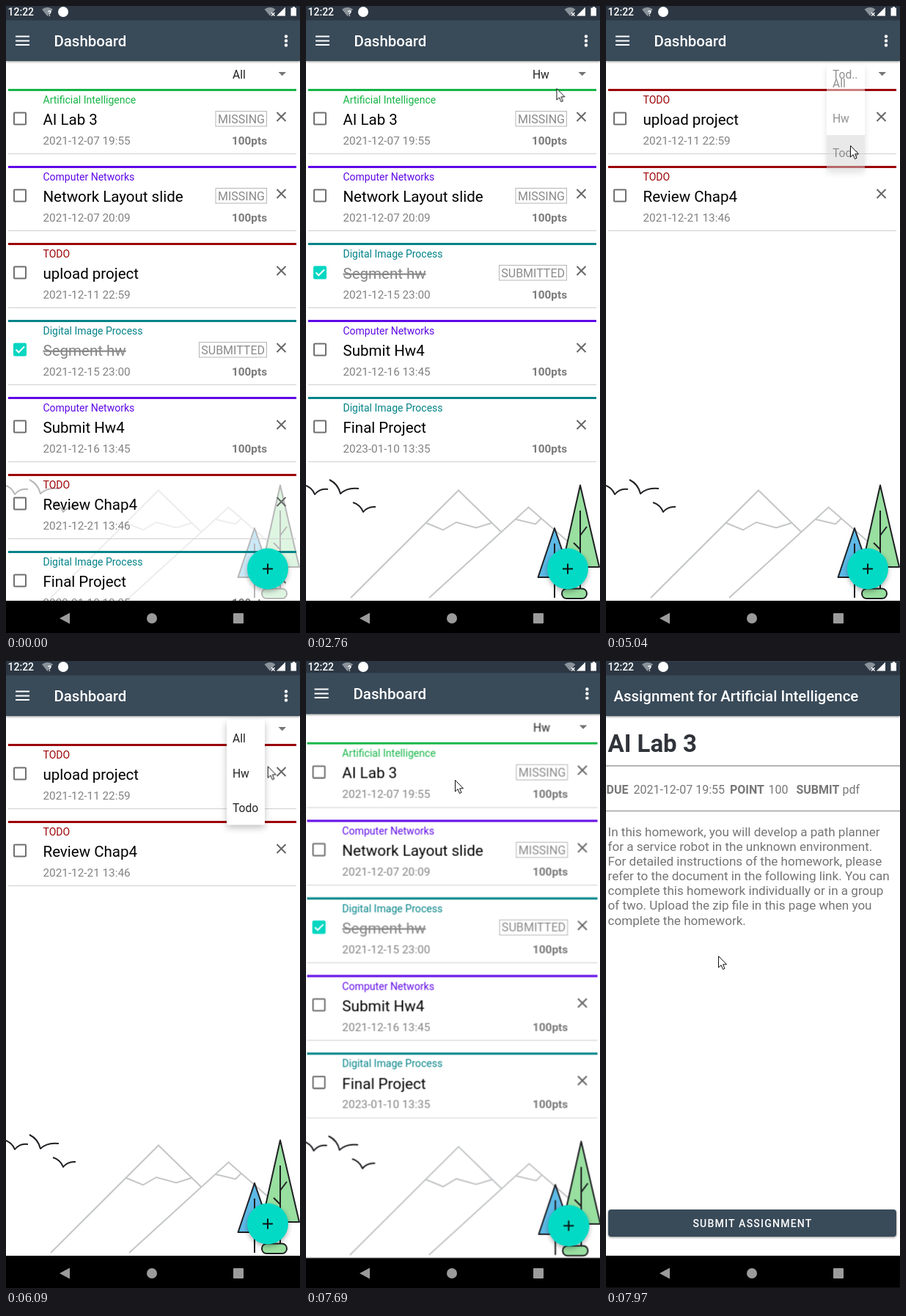
An HTML page that plays this animation: 401 by 855 pixels, repeating every 8 s.

```html
<!DOCTYPE html>
<html lang="en">
<head>
<meta charset="utf-8">
<title>Dashboard filter</title>
<style>
html, body { margin: 0; width: 100%; height: 100%; overflow: hidden; background: #fff; }
svg { display: block; width: 401px; height: 855px; font-family: Roboto, "Noto Sans", sans-serif; }
text { white-space: pre; }

.bar { fill: #394a59; filter: drop-shadow(0 1px 1.5px rgba(0,0,0,.45)); }
.head { font-size: 20.4px; font-weight: 500; fill: #fff; }
.course { font-size: 14px; }
.title { font-size: 20.5px; fill: #000; }
.done { fill: #858585; text-decoration: line-through; }
.date { font-size: 15.3px; fill: #828282; }
.pts { font-size: 15.3px; font-weight: 700; fill: #7a7a7a; text-anchor: end; }
.badge { font-size: 16px; fill: #8a8a8a; text-anchor: end; }
.label { font-size: 15.6px; fill: #222; }
.line { fill: none; stroke-width: 2; }
.ink { stroke: #202124; stroke-width: 2; stroke-linejoin: round; }
.fab { filter: drop-shadow(0 3px 3px rgba(0,0,0,.3)); }
.meta, .meta tspan { font-size: 16px; fill: #777; }
.meta .b { font-weight: 700; }
.para { font-size: 17.1px; fill: #757575; }

/* Every animation shares one 8 s clock: 1% is 80 ms. */
.anim { animation: 8s linear infinite; }
.step { animation-timing-function: step-end; }

#all { animation-name: all; }
@keyframes all { 0% { opacity: 1 } 27.1%, 100% { opacity: 0 } }
#hw { animation-name: hw; }
@keyframes hw { 0% { opacity: 0 } 27.1% { opacity: 1 } 61.75% { opacity: 0 } 82%, 100% { opacity: 1 } }
#todo { animation-name: todo; }
@keyframes todo { 0% { opacity: 0 } 61.75% { opacity: 1 } 82%, 100% { opacity: 0 } }
#art { animation-name: art; }
@keyframes art { 0% { opacity: .32 } 27.1%, 100% { opacity: 1 } }

#popup { animation-name: popup; filter: drop-shadow(0 4px 5px rgba(0,0,0,.24)); }
@keyframes popup {
  0%, 15.5% { opacity: 0; clip-path: inset(0 0 110px 0) }
  18%, 27.1% { opacity: 1; clip-path: inset(-20px) }
  29.6% { opacity: 0; clip-path: inset(-20px) }
  29.61%, 51.375% { opacity: 0; clip-path: inset(0 0 110px 0) }
  54%, 61.75% { opacity: 1; clip-path: inset(-20px) }
  64.25% { opacity: 0; clip-path: inset(-20px) }
  64.26%, 71% { opacity: 0; clip-path: inset(0 0 110px 0) }
  73.5%, 82% { opacity: 1; clip-path: inset(-20px) }
  84.5%, 100% { opacity: 0; clip-path: inset(-20px) }
}
#pressHw { animation-name: pressHw; }
@keyframes pressHw {
  0%, 25.6% { opacity: 0 } 26.4%, 29.6% { opacity: .17 }
  29.61%, 80.5% { opacity: 0 } 81.3%, 84.5% { opacity: .17 } 84.51%, 100% { opacity: 0 }
}
#pressTodo { animation-name: pressTodo; }
@keyframes pressTodo {
  0%, 60.25% { opacity: 0 } 61%, 64.25% { opacity: .17 } 64.26%, 100% { opacity: 0 }
}
#ripple { animation-name: ripple; transform-origin: 373px 92px; }
@keyframes ripple {
  0%, 14.5% { opacity: 0; transform: scale(.4) }
  15.25% { opacity: .13; transform: scale(.7) }
  16.5% { opacity: .13; transform: scale(1) }
  18.5% { opacity: 0; transform: scale(1) }
  18.51%, 50.375% { opacity: 0; transform: scale(.4) }
  51.125% { opacity: .13; transform: scale(.7) }
  52.4% { opacity: .13; transform: scale(1) }
  54.4% { opacity: 0; transform: scale(1) }
  54.41%, 70% { opacity: 0; transform: scale(.4) }
  70.75% { opacity: .13; transform: scale(.7) }
  72% { opacity: .13; transform: scale(1) }
  74%, 100% { opacity: 0; transform: scale(1) }
}

#dash, #zoom { transform-origin: 200.5px 427.5px; }
#dash { animation-name: leave; }
@keyframes leave {
  0% { transform: scale(1) }
  95.75% { transform: scale(1); animation-timing-function: cubic-bezier(.3,0,.8,.15) }
  96.59% { transform: scale(1.06); animation-timing-function: cubic-bezier(.06,.7,.12,1) }
  100% { transform: scale(1.15) }
}
#zoom { animation-name: enter; }
@keyframes enter {
  0% { transform: scale(.85) }
  95.75% { transform: scale(.85); animation-timing-function: cubic-bezier(.3,0,.8,.15) }
  96.59% { transform: scale(.91); animation-timing-function: cubic-bezier(.06,.7,.12,1) }
  100% { transform: scale(1) }
}
#detail { animation-name: show; }
@keyframes show { 0%, 96.19% { opacity: 0 } 96.81%, 100% { opacity: 1 } }

#cursor { animation-name: cursor; }
@keyframes cursor {
  0%, 4.99% { opacity: 0; transform: translate(387px,146px) }
  5% { opacity: 1; transform: translate(387px,146px) }
  8%, 10.85% { transform: translate(343px,99px) }
  10.875%, 12.6% { transform: translate(343px,98px) }
  12.625%, 21.3% { transform: translate(331px,86px) }
  24.2%, 31.5% { transform: translate(325px,151px) }
  37%, 40.6% { transform: translate(355px,80px) }
  41.6% { transform: translate(343px,68px) }
  42.6%, 45.22% { transform: translate(355px,81px) }
  45.25%, 47.2% { transform: translate(355px,82px) }
  49.5%, 54.5% { transform: translate(355px,90px) }
  59.5%, 68% { transform: translate(333px,190px) }
  69.9%, 73.6% { transform: translate(357px,84px) }
  76.1% { transform: translate(357px,143px) }
  77.1%, 79.1% { transform: translate(350px,150px) }
  80.2%, 83% { transform: translate(325px,150px) }
  86.4%, 92% { transform: translate(191px,150px) }
  93%, 96.2% { transform: translate(203px,162px) }
  99.5%, 100% { opacity: 1; transform: translate(153px,402px) }
}
</style>
</head>
<body>
<svg viewBox="0 0 401 855">
  <rect width="401" height="855" fill="#fff"/>

  <g id="dash" class="anim">
    <rect width="401" height="855" fill="#fff"/>
    <g id="art" class="anim step">
      <g class="line" stroke="#c4c6c7">
        <path d="M61 807 208 660.500 266 717M168 807 303.500 683.500 358 731"/>
        <path d="M164 705 187 714.500 205 704 232 711.500 253 705M286 700 313 706.500 321 698.500"/>
      </g>
      <path class="ink" fill="none" d="M-3 653Q8 656 12 666Q19 657 30 659M32 646Q44 652 47 665Q56 656 72 658M64 677Q74 680 78 690Q84 682 95 683"/>
      <path class="ink" fill="#5cb9e6" d="M339 712 362 779H316.500Z"/>
      <path class="ink" fill="#98dfa0" d="M374 653.500 400 765H349Z"/>
      <rect class="ink" x="349" y="794.500" width="34" height="13.500" rx="6.500" fill="#98dfa0"/>
      <path class="ink" fill="none" d="M339 733V807M374 688V795M374 722 383 710M374 741 365 732"/>
    </g>
    <g id="all" class="anim step"></g>
    <g id="hw" class="anim step"></g>
    <g id="todo" class="anim step"></g>
    <circle id="ripple" class="anim" cx="373" cy="92" r="23"/>
    <path d="M371.500 90H382L376.750 95.300Z" fill="#757575"/>

    <rect class="bar" y="19" width="401" height="56"/>
    <rect width="401" height="19.500" fill="#2c3743"/>
    <path class="line" stroke="#fff" d="M13 41.500H32M13 47.500H32M13 53H32"/>
    <text class="head" x="65.500" y="55">Dashboard</text>
    <g fill="#fff"><circle cx="382" cy="41.500" r="2.200"/><circle cx="382" cy="47.500" r="2.200"/><circle cx="382" cy="53.500" r="2.200"/></g>

    <g id="popup" class="anim">
      <rect x="301" y="80" width="52" height="143.500" rx="2" fill="#fff"/>
      <rect id="pressHw" class="anim" x="301" y="128" width="52" height="48"/>
      <rect id="pressTodo" class="anim" x="301" y="176" width="52" height="47.500"/>
      <text class="label" x="309" y="110.500">All</text>
      <text class="label" x="309" y="158.500">Hw</text>
      <text class="label" x="309" y="206">Todo</text>
    </g>

    <circle class="fab" cx="357" cy="767.500" r="28" fill="#03dac5"/>
    <path class="line" stroke="#0b1514" d="M350 767.500H364M357 760.500V774.500"/>
    <rect y="811" width="401" height="44"/>
  </g>

  <g id="detail" class="anim"><g id="zoom" class="anim">
    <rect width="401" height="855" fill="#fff"/>
    <rect class="bar" y="19" width="401" height="56"/>
    <rect width="401" height="19.500" fill="#2c3743"/>
    <text class="head" x="10.500" y="55">Assignment for Artificial Intelligence</text>
    <text x="2.500" y="124" font-size="33" font-weight="700" fill="#30343a">AI Lab 3</text>
    <path class="line" stroke="#b4b4b4" d="M0 143H401M0 204.500H401"/>
    <text class="meta" y="180.500"><tspan class="b" x="0.500">DUE</tspan><tspan x="37.500">2021-12-07 19:55</tspan><tspan class="b" x="169">POINT</tspan><tspan x="221.500">100</tspan><tspan class="b" x="259.500">SUBMIT</tspan><tspan x="322.500">pdf</tspan></text>
    <g id="para" class="para"></g>
    <rect class="bar" x="3" y="748" width="393" height="37" rx="4"/>
    <text x="200" y="772" font-size="14" font-weight="500" letter-spacing="1.25" fill="#fff" text-anchor="middle">SUBMIT ASSIGNMENT</text>
    <rect y="811" width="401" height="44"/>
  </g></g>

  <g fill="#fff">
    <text x="2.500" y="13" font-size="14" font-weight="500">12:22</text>
    <path d="M49 4.500Q56.500-1 64 4.500L56.500 14Z" fill="#8a929a"/>
    <text x="57" y="13.500" font-size="10" font-weight="700">?</text>
    <circle cx="78" cy="8" r="7"/>
    <path d="M352.500 4.500Q360-1 367.500 4.500L360 13.500Z" fill="#8a929a"/>
    <path class="line" stroke="#fff" style="stroke-width:1.300" d="M362 9 366.500 13.500M366.500 9 362 13.500"/>
    <path d="M381 1.500V13.500H369Z"/>
    <path d="M391 1H394V2.500H396V13.500H388.500V2.500H391Z"/>
  </g>
  <g fill="#9b9b9b">
    <path d="M87 827.500V842.500L73 835Z"/>
    <circle cx="199" cy="835" r="7"/>
    <rect x="310" y="828" width="14" height="14" rx="1"/>
  </g>

  <path id="cursor" class="anim" d="M.5.5V16L4.100 12.700 6.500 18.500 9 17.400 6.600 11.800H11.500Z" fill="#fff" stroke="#111"/>
</svg>

<script>
const byId = id => document.getElementById(id);

const courses = {
  ai: ['Artificial Intelligence', '#15b546'],
  net: ['Computer Networks', '#5f08e6'],
  todo: ['TODO', '#9c0306'],
  image: ['Digital Image Process', '#038388'],
};
const tasks = [
  ['ai', 'AI Lab 3', '2021-12-07 19:55', 'MISSING'],
  ['net', 'Network Layout slide', '2021-12-07 20:09', 'MISSING'],
  ['todo', 'upload project', '2021-12-11 22:59'],
  ['image', 'Segment hw', '2021-12-15 23:00', 'SUBMITTED'],
  ['net', 'Submit Hw4', '2021-12-16 13:45'],
  ['todo', 'Review Chap4', '2021-12-21 13:46'],
  ['image', 'Final Project', '2023-01-10 13:35'],
];
const badgeWidth = { MISSING: 70, SUBMITTED: 92.5 };

function checkbox(done) {
  return done
    ? `<rect x="10" y="31.500" width="18" height="18" rx="2" fill="#03d6c1"/>
       <path class="line" stroke="#fff" d="M13.500 40.500 17.300 44.300 25 36.500"/>`
    : `<rect class="line" x="11" y="32.500" width="16" height="16" rx="1" stroke="#707070"/>`;
}

function badge(word) {
  if (!word) return '';
  const w = badgeWidth[word];
  return `<rect x="${356 - w}" y="30.500" width="${w - .5}" height="20.500" fill="none" stroke="#b5b5b5"/>
    <text class="badge" x="353" y="46.500">${word}</text>`;
}

function row([kind, title, date, state], i) {
  const [course, color] = courses[kind];
  const done = state === 'SUBMITTED';
  return `<g transform="translate(0 ${113 + i * 105})">
    <rect x="3" width="393" height="3" fill="${color}"/>
    <text class="course" x="50.500" y="20" fill="${color}">${course}</text>
    ${checkbox(done)}
    <text class="title ${done ? 'done' : ''}" x="50.500" y="49">${title}</text>
    <text class="date" x="50.500" y="75.500">${date}</text>
    ${badge(state)}
    ${kind === 'todo' ? '' : '<text class="pts" x="356" y="75.500">100pts</text>'}
    <path class="line" stroke="#666" d="M369.500 32 381.500 44M381.500 32 369.500 44"/>
    <rect x="3" y="88" width="393" height="1" fill="#cfcfcf"/>
  </g>`;
}

function fill(id, label, test) {
  byId(id).innerHTML = `<text class="label" x="309" y="98.500">${label}</text>` +
    tasks.filter(test).map(row).join('');
}
fill('all', 'All', () => true);
fill('hw', 'Hw', t => t[0] !== 'todo');
fill('todo', 'Tod..', t => t[0] === 'todo');

byId('para').innerHTML = [
  'In this homework, you will develop a path planner',
  'for a service robot in the unknown environment.',
  'For detailed instructions of the homework, please',
  'refer to the document in the following link. You can',
  'complete this homework individually or in a group',
  'of two. Upload the zip file in this page when you',
  'complete the homework.',
].map((s, i) => `<text x="2.500" y="${238.700 + i * 20.150}">${s}</text>`).join('');
</script>
</body>
</html>
```
